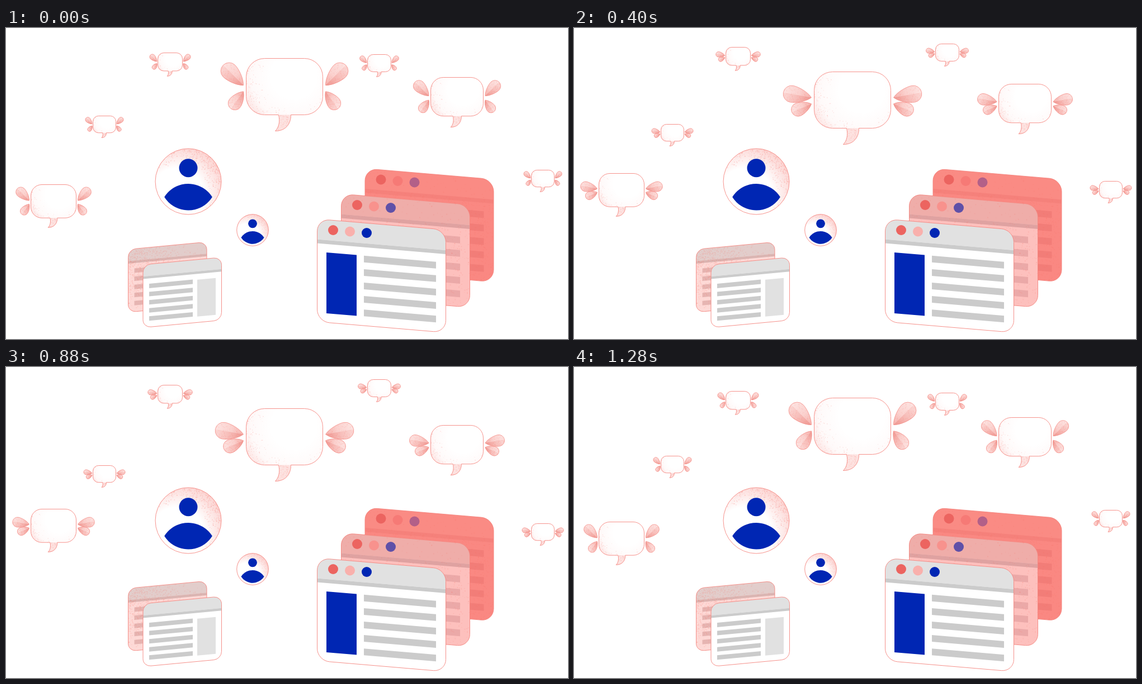
Animation of 1005x557 px, one loop 1.36 s. Source, as an HTML page with a canvas:

```html
<!DOCTYPE html>
<html lang="en">
<head>
<meta charset="utf-8">
<title>Flying messages</title>
<style>
html, body { margin: 0; width: 100%; height: 100%; overflow: hidden; background: #fff; }
canvas { display: block; width: 100%; height: 100%; }
</style>
</head>
<body>
<canvas id="stage" width="1005" height="557"></canvas>
<script>
const W = 1005, H = 557, STEP = 80, COUNT = 17;
const LINE = '#f58780', BLUE = '#0026b3';
const RED = '244,110,102';
const ctx = document.getElementById('stage').getContext('2d');

function seeded(seed) {
  return () => {
    seed = (seed + 0x6D2B79F5) | 0;
    let t = Math.imul(seed ^ (seed >>> 15), 1 | seed);
    t = (t + Math.imul(t ^ (t >>> 7), 61 | t)) ^ t;
    return ((t ^ (t >>> 14)) >>> 0) / 4294967296;
  };
}

// Scatter specks over a box; density(u, v) takes 0..1 coordinates.
function grain(c, x, y, w, h, n, density, alpha, size, seed) {
  const rnd = seeded(seed);
  c.fillStyle = `rgba(${RED},${alpha})`;
  for (let i = 0; i < n; i++) {
    const u = rnd(), v = rnd(), s = size * (0.6 + rnd() * 0.8);
    if (rnd() < density(u, v)) c.fillRect(x + u * w, y + v * h, s, s);
  }
}

function rounded(x, y, w, h, r) {
  const p = new Path2D();
  p.roundRect(x, y, w, h, r);
  return p;
}

function disc(c, x, y, r, fill) {
  c.beginPath();
  c.arc(x, y, r, 0, Math.PI * 2);
  c.fillStyle = fill;
  c.fill();
}

function outline(c, path, width) {
  c.strokeStyle = LINE;
  c.lineWidth = width;
  c.stroke(path);
}

/* ---- still scene ---- */

function avatar(c, x, y, k, seed) {
  c.save();
  c.translate(x, y);
  c.scale(k, k);
  const ring = new Path2D();
  ring.arc(0, 0, 59, 0, Math.PI * 2);
  c.fillStyle = '#fff';
  c.fill(ring);
  c.save();
  c.clip(ring);
  const g = c.createRadialGradient(-20, 24, 48, -20, 24, 91);
  g.addColorStop(0, `rgba(${RED},0)`);
  g.addColorStop(1, `rgba(${RED},.3)`);
  c.fillStyle = g;
  c.fillRect(-60, -60, 120, 120);
  grain(c, -60, -60, 120, 120, 3600, (u, v) => {
    const d = Math.hypot(u * 120 - 40, v * 120 - 84);
    return Math.max(0, (d - 54) / 55);
  }, 0.24, 1.2, seed);
  c.restore();
  outline(c, ring, 0.9 / k);
  disc(c, 0, -24.3, 16.5, BLUE);
  // two equal arcs meeting at pointed ends
  const r = 50.5, a = Math.asin(43 / r), up = Math.PI / 2;
  c.beginPath();
  c.arc(0, 4 + r, r, -up - a, -up + a);
  c.arc(0, 51.5 - r, r, up - a, up + a);
  c.fill();
  c.restore();
}

function pane(c, o) {
  c.save();
  c.transform(1, o.slope, 0, 1, o.x, o.y);
  const shape = rounded(0, 0, o.w, o.h, o.r);
  c.save();
  c.clip(shape);
  c.fillStyle = o.body;
  c.fillRect(0, 0, o.w, o.h);
  c.fillStyle = o.head;
  c.fillRect(0, 0, o.w, o.bar);
  c.fillStyle = o.stripe;
  c.fillRect(0, o.bar, o.w, o.barH);
  const [lx, ly, lw, lh, gap] = o.lines;
  c.fillStyle = o.ink;
  for (let i = 0; i < 5; i++) c.fillRect(lx, ly + i * gap, lw, lh);
  if (o.panel) {
    c.fillStyle = o.panel[4];
    c.fillRect(...o.panel.slice(0, 4));
  }
  if (o.density) grain(c, 0, 0, o.w, o.h, o.specks, o.density, 0.16, 1.4, 77);
  c.restore();
  outline(c, shape, 0.9);
  c.restore();
  (o.dots || []).forEach((fill, i) => disc(c, o.x + 28.5 + i * 30, o.y + 20 + i * 2.5, 9, fill));
}

function buildScene() {
  const still = document.createElement('canvas');
  still.width = W;
  still.height = H;
  const c = still.getContext('2d');
  c.fillStyle = '#fff';
  c.fillRect(0, 0, W, H);

  avatar(c, 326, 275, 1, 5);
  avatar(c, 441, 362, 0.48, 9);

  const big = { slope: 0.085, w: 230, h: 184, r: 22, bar: 36.5, barH: 7, lines: [83.5, 58.7, 129, 12, 24.1] };
  pane(c, { ...big, x: 642, y: 251.5, body: '#fa8882', head: '#fa8b84', stripe: '#f5817b', ink: '#f27d78',
    dots: ['#ec6460', '#f67a76', '#b36088'], specks: 3500, density: (u, v) => v > 0.2 ? 0.55 : 0.1 });
  pane(c, { ...big, x: 599.5, y: 297, body: '#fdc0bd', head: '#efada9', stripe: '#dfa2a1', ink: '#eba9a8',
    dots: ['#ec6460', '#f8928d', '#5f50a8'], specks: 2600, density: (u, v) => v > 0.2 ? 0.45 * (1 - v * 0.5) : 0.08 });
  pane(c, { ...big, x: 556.5, y: 342, body: '#fff', head: '#e1e1e1', stripe: '#cbcbcb', ink: '#cbcbcb',
    dots: ['#ec6460', '#f9b0ac', BLUE], panel: [16.5, 58.5, 54, 109, BLUE] });

  const small = { slope: -0.095, w: 140.5, h: 112.6, r: 14, bar: 21, barH: 4.5, lines: [11, 35, 78, 8, 14.6] };
  pane(c, { ...small, x: 218.5, y: 396.5, body: '#fdd9d6', head: '#e2cdcb', stripe: '#dab5b2', ink: '#e6b5b2',
    specks: 4200, density: (u, v) => Math.max(0.05, 0.85 - Math.hypot(u - 0.25, (v - 0.3) * 0.8) * 1.7) });
  pane(c, { ...small, x: 245, y: 424, body: '#fff', head: '#e1e1e1', stripe: '#cbcbcb', ink: '#cbcbcb',
    panel: [97, 36, 33, 66, '#e1e1e1'] });
  return still;
}

/* ---- flying bubbles ---- */

// left, top, width, travel, step of the far point, step of the return
const bubbles = [
  [429, 54, 137, 30.5, 7.1, 17],
  [271, 44, 44, -15, 8.5, 17.5],
  [646, 47, 42, -31, 8.6, 17.2],
  [759, 88, 94, 19, 8.4, 18],
  [155, 157, 41, 23, 8.4, 18],
  [44, 280, 81, -31, 8.5, 18],
  [939, 254, 41, 32, 8.6, 17.2]
];

const bodyShape = (() => {
  const p = new Path2D();
  p.moveTo(33, 0);
  p.lineTo(104, 0);
  p.arcTo(137, 0, 137, 33, 33);
  p.lineTo(137, 68);
  p.arcTo(137, 101, 104, 101, 33);
  p.lineTo(80, 101);
  p.bezierCurveTo(80, 118, 70, 130, 52, 130);
  p.bezierCurveTo(58, 124, 61, 114, 58, 101);
  p.lineTo(33, 101);
  p.arcTo(0, 101, 0, 68, 33);
  p.lineTo(0, 33);
  p.arcTo(0, 0, 33, 0, 33);
  p.closePath();
  return p;
})();

// Pointed at the root, with a round end.
function leaf(len, half) {
  const mid = len - half, shape = new Path2D();
  shape.moveTo(0, 0);
  shape.bezierCurveTo(len * 0.17, -half * 0.62, mid - half * 0.6, -half, mid, -half);
  shape.arc(mid, 0, half, -Math.PI / 2, Math.PI / 2);
  shape.bezierCurveTo(mid - half * 0.6, half, len * 0.17, half * 0.62, 0, 0);
  shape.closePath();
  return { len, half, shape };
}

const upper = leaf(51, 15), lower = leaf(38, 12);

function wing(c, { len, half, shape }, y, angle, k) {
  c.save();
  c.translate(5, y);
  c.rotate(angle * Math.PI / 180);
  const g = c.createLinearGradient(0, 0, len, 0);
  g.addColorStop(0, '#f5b3ae');
  g.addColorStop(0.45, '#fbd2cf');
  g.addColorStop(1, '#fde3e1');
  c.fillStyle = g;
  c.fill(shape);
  c.save();
  c.clip(shape);
  const shade = c.createLinearGradient(0, 0, len, 0);
  shade.addColorStop(0, 'rgba(228,110,102,.4)');
  shade.addColorStop(1, 'rgba(240,130,122,.1)');
  c.fillStyle = shade;
  c.fillRect(0, 0, len, half);
  grain(c, 0, -half, len, half * 2, 260 * k, (u, v) => 0.8 - u * 0.35, 0.16, 1 / k, 31);
  c.restore();
  outline(c, shape, 0.7 / k);
  c.restore();
}

function bubble(c, x, y, k, flap) {
  c.save();
  c.translate(x + 0.5, Math.round(y) + 0.5);
  c.scale(k, k);
  for (const side of [-1, 1]) {
    c.save();
    if (side > 0) c.translate(137, 0);
    c.scale(side, 1);
    wing(c, upper, 47 + flap, -(27 + 18 * flap), k);
    wing(c, lower, 58.3 + flap, 38 + 16 * flap, k);
    c.restore();
  }
  c.fillStyle = '#fff';
  c.fill(bodyShape);
  c.save();
  c.clip(bodyShape);
  const g = c.createRadialGradient(85, 32, 40, 85, 32, 115);
  g.addColorStop(0, `rgba(${RED},0)`);
  g.addColorStop(0.5, `rgba(${RED},.04)`);
  g.addColorStop(1, `rgba(${RED},.3)`);
  c.fillStyle = g;
  c.fillRect(0, 0, 137, 101);
  c.fillStyle = `rgba(${RED},.2)`;
  c.fillRect(48, 101, 40, 30);
  grain(c, 0, 0, 137, 131, 3200 * k * k, (u, v) => {
    if (v > 0.77) return 0.6;
    return Math.max(0, Math.hypot(u * 137 - 85, v * 131 - 32) - 55) / 110;
  }, 0.2, 1.1 / k, 12);
  c.restore();
  outline(c, bodyShape, 0.9 / k);
  c.restore();
}

function travel(step, peak, end) {
  const part = step < peak ? step / peak : 1 + (step - peak) / (end - peak);
  return (1 - Math.cos(Math.PI * part)) / 2;
}

const scene = buildScene();

function draw(step) {
  const flap = Math.cos(2 * Math.PI * 5 * step / 16);
  ctx.drawImage(scene, 0, 0);
  for (const [x, y, w, dist, peak, end] of bubbles) {
    bubble(ctx, x, y + dist * travel(step, peak, end), w / 137, flap);
  }
}

let shown = -1;
const start = performance.now();
function tick(now) {
  const step = Math.floor(Math.max(0, now - start) / STEP) % COUNT;
  if (step !== shown) draw(shown = step);
  requestAnimationFrame(tick);
}
draw(shown = 0);
requestAnimationFrame(tick);
</script>
</body>
</html>
```
